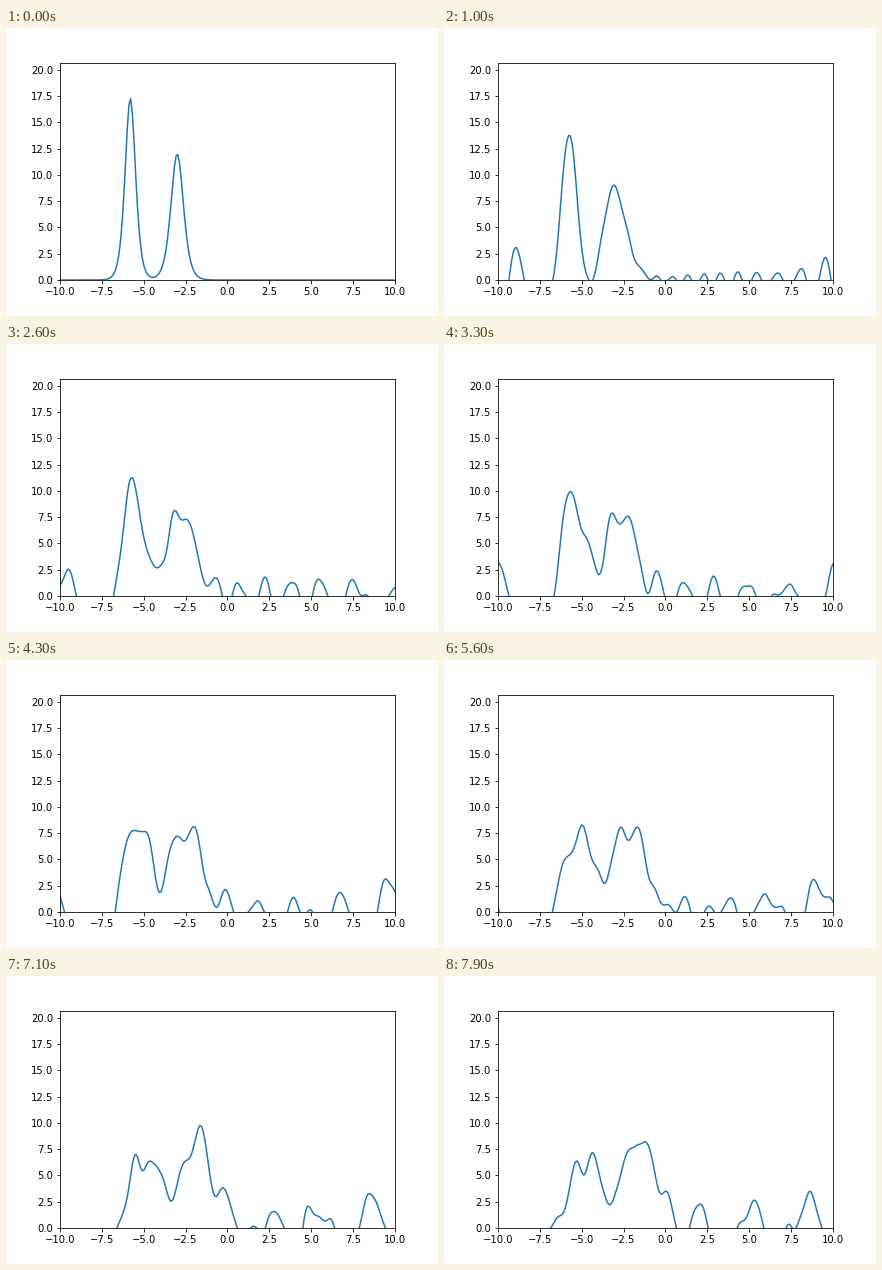
Recreate the animation shown at these times as a matplotlib script. Size 432 by 288 pixels, loop 8 s.

```python
import numpy as np
import matplotlib.pyplot as plt
from matplotlib.animation import FuncAnimation

# Korteweg-de Vries equation u_t + u u_x + u_xxx = 0 on a periodic grid,
# solved in Fourier space with an integrating factor and RK4.
N = 200
FRAMES, INTERVAL = 80, 100
FRAME_TIME, SUBSTEPS = 0.01, 100

x = np.linspace(-10, 10, N)
k = 2 * np.pi * np.fft.rfftfreq(N, d=x[1] - x[0])


def pulse(a, x0):
    return 3 * a**2 / np.cosh(a * (x - x0))**2


def solve(u0):
    dt = FRAME_TIME / SUBSTEPS
    half = np.exp(0.5j * dt * k**3)
    full = half**2
    g = -0.5j * dt * k

    def flux(v):
        return g * np.fft.rfft(np.fft.irfft(v, N)**2)

    v = np.fft.rfft(u0)
    states = [u0]
    for _ in range(FRAMES - 1):
        for _ in range(SUBSTEPS):
            a = flux(v)
            b = flux(half * (v + a / 2))
            c = flux(half * v + b / 2)
            d = flux(full * v + half * c)
            v = full * v + (full * a + 2 * half * (b + c) + d) / 6
        states.append(np.fft.irfft(v, N))
    return states


states = solve(pulse(2.4, -5.8) + pulse(2.0, -3.0))

plt.rcParams.update({"font.family": "DejaVu Sans", "font.size": 10})
fig, ax = plt.subplots(figsize=(6, 4), dpi=72)
fig.subplots_adjust(left=0.125, right=0.9, bottom=0.125, top=0.88)
ax.set_xlim(-10, 10)
ax.set_ylim(0, 1.2 * states[0].max())
line, = ax.plot(x, states[0], color="#1f77b4", lw=1.5)


def update(i):
    line.set_ydata(states[i])
    return line,


anim = FuncAnimation(fig, update, frames=FRAMES, interval=INTERVAL,
                     repeat=True, repeat_delay=0)
plt.show()
```
